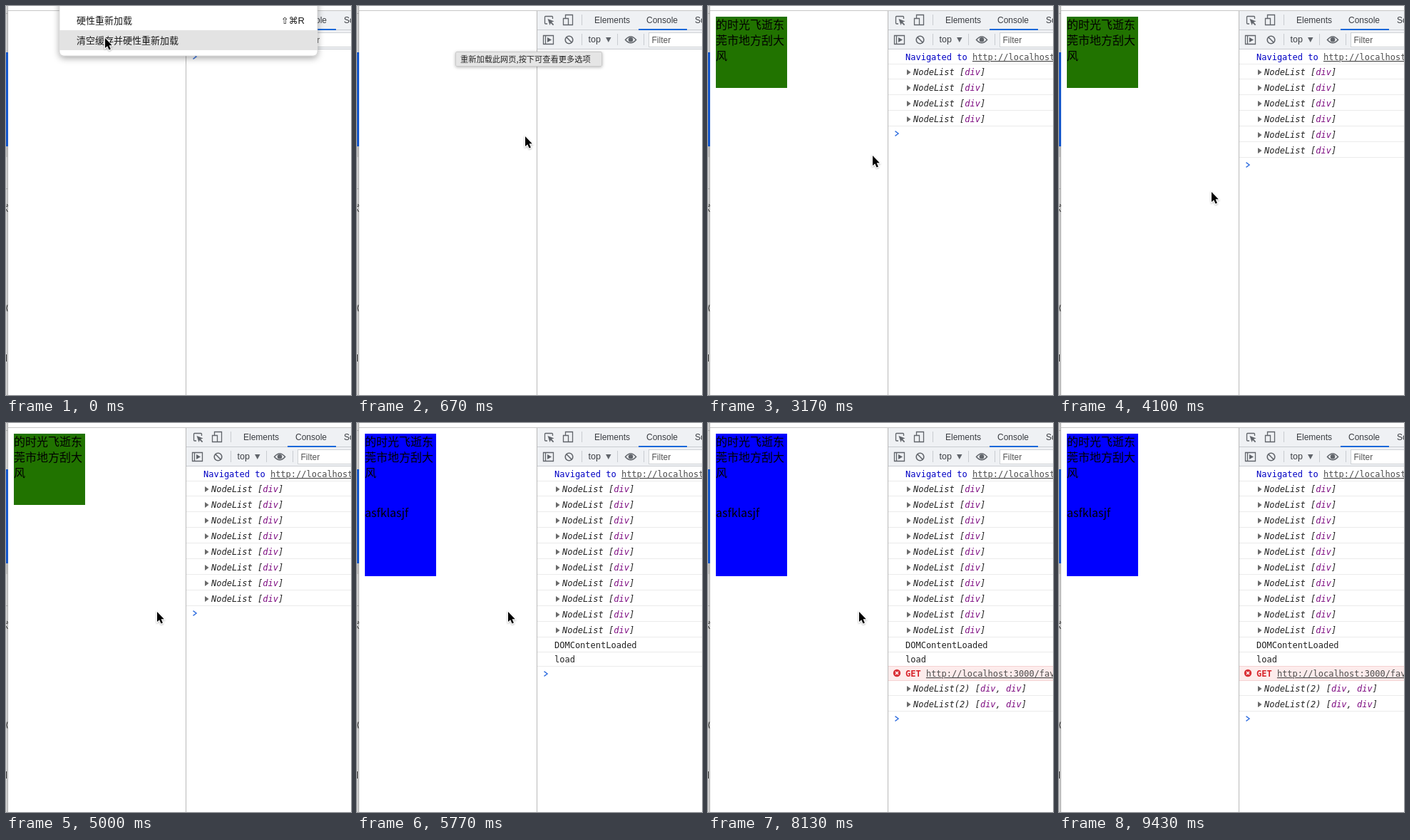
Recreate the animation shown at these times as an HTML page. Size 484 by 546 pixels, loop 9460 ms.

```html
<!DOCTYPE html>
<html lang="zh">
<head>
<meta charset="utf-8">
<style>
  html, body { margin: 0; width: 100%; height: 100%; overflow: hidden; background: #fff; }
  svg { display: block; width: 484px; height: 546px; }
  text { white-space: pre; }
  .ui { font: 12px "Liberation Sans", Arial, sans-serif; fill: #3a3d42; }
  .cjk { font-family: "Noto Sans CJK SC", "Noto Sans CJK", "Noto Sans CJK JP", sans-serif; }
  .mono { font: 12px "DejaVu Sans Mono", monospace; fill: #222; }
  .node { font-style: italic; }
  .tag { fill: #7d0a80; }
  .nav { fill: #0000c4; }
  .link { fill: #4d4d4d; text-decoration: underline; }
  .icon { fill: none; stroke: #61656b; stroke-width: 1.3; }
  .solid { fill: #61656b; }
  .rule { fill: #c9ccd1; }
  .hide { visibility: hidden; }
</style>
</head>
<body>
<svg viewBox="0 0 484 546">
  <defs>
    <filter id="soft" x="-20%" y="-40%" width="140%" height="200%">
      <feDropShadow dx="0" dy="3" stdDeviation="5" flood-opacity=".35"/>
    </filter>
    <filter id="faint" x="-10%" y="-40%" width="120%" height="200%">
      <feDropShadow dx="0" dy="1" stdDeviation="2" flood-opacity=".3"/>
    </filter>
    <filter id="drop" x="-50%" y="-50%" width="200%" height="200%">
      <feDropShadow dx="0" dy="1" stdDeviation=".8" flood-opacity=".35"/>
    </filter>
  </defs>
  <rect width="484" height="546" fill="#fff"/>

  <!-- window behind, at the left edge -->
  <rect width="3" height="546" fill="#d0d0d0"/>
  <rect y="197" width="3" height="15" fill="#bdbdbd"/>
  <rect x="2" width="1" height="546" fill="#adadad"/>
  <rect y="65" width="3" height="132" fill="#1759cc"/>
  <path d="M0 10.5H3M0 256.5H3" stroke="#a8a8a8"/>
  <path d="M0 281H3M0 285L2.5 289M1 278L3 280M2 419.5Q-.5 424 2 428.5M.5 489V499" fill="none" stroke="#222"/>
  <rect x="3" y="6" width="481" height="1" fill="#c6c6c6"/>

  <!-- page content -->
  <g id="page" class="cjk" font-size="16">
    <rect id="box" x="11" y="15" width="100" height="100"/>
    <text x="11" y="32">的时光飞逝东</text>
    <text x="11" y="54">莞市地方刮大</text>
    <text x="11" y="76">风</text>
    <text id="second" x="11" y="132">asfklasjf</text>
  </g>

  <!-- developer tools -->
  <rect x="252" y="7" width="1" height="539" fill="#b9b9b9"/>
  <rect x="253" y="7" width="231" height="54" fill="#eff1f4"/>
  <rect class="rule" x="253" y="33" width="231" height="1"/>
  <rect class="rule" x="253" y="60" width="231" height="1"/>
  <rect x="395" y="32" width="68" height="2" fill="#1a68d9"/>
  <path class="rule" d="M315 12h1v15h-1zM315 39h1v16h-1zM365 39h1v16h-1zM402 39h1v16h-1z"/>
  <g class="icon">
    <path d="M267 25H264.5Q263.5 25 263.5 24V15.500Q263.500 14.500 264.500 14.500H273.500Q274.500 14.500 274.500 15.500V18"/>
    <path d="M292.500 17V12.500H302.500V26.500H297M289.500 17.500H296.500V26.500H289.500Z"/>
    <path d="M261.500 41.500H275.500V53.500H261.500ZM264.500 41.500V53.500"/>
    <circle cx="297.500" cy="47.500" r="5.300" stroke-width="1.600"/>
    <path d="M293.800 43.800L301.200 51.200" stroke-width="1.600"/>
    <path d="M376.500 47.500Q384 38.500 391.500 47.500Q384 56 376.500 47.500Z" stroke-width="1.600"/>
  </g>
  <g class="solid">
    <path d="M267.500 18L276.500 21.500L273 22.800L276.200 26L275 27.200L271.800 24L270.500 27Z"/>
    <path d="M267 44L273 47.500L267 51Z"/>
    <path d="M349 44H356.500L352.750 51Z"/>
    <circle cx="384" cy="47.300" r="3.300"/>
  </g>
  <rect x="409.500" y="37.500" width="80" height="20" fill="#fff" stroke="#cfd2d6"/>
  <g class="ui">
    <text x="333" y="24">Elements</text>
    <text x="406" y="24">Console</text>
    <text x="474" y="24">Sources</text>
    <text x="324.500" y="51" font-size="12.500">top</text>
    <text x="413.500" y="52" fill="#555">Filter</text>
  </g>
  <g id="log"></g>
  <path id="prompt" d="M262.500 -3.300L267 0L262.500 3.300" fill="none" stroke="#3672e0" stroke-width="1.500"/>

  <!-- popups and pointer -->
  <g id="menu">
    <rect x="75" y="-30" width="362" height="100" rx="6" fill="#fff" stroke="#b5b5b5" stroke-width=".5" filter="url(#soft)"/>
    <rect x="75" y="34" width="362" height="28" fill="#e3e3e3"/>
    <g class="cjk" font-size="13" fill="#1c1c1c">
      <text x="99" y="25">硬性重新加载</text>
      <text x="99" y="53">清空缓存并硬性重新加载</text>
      <text x="419" y="25" text-anchor="end" style="font-family:'Liberation Sans','DejaVu Sans',sans-serif">⇧⌘R</text>
    </g>
  </g>
  <g id="tip">
    <rect x="138.500" y="64.500" width="205" height="20" rx="1.500" fill="#e5e5e5" stroke="#cbcbcb" filter="url(#faint)"/>
    <text class="cjk" x="145" y="78.500" font-size="11.230" fill="#262626">重新加载此网页,按下可查看更多选项</text>
  </g>
  <path id="pointer" d="M0 0V14L3.200 11.200L5.600 16.600L7.900 15.600L5.600 10.300H9.800Z" stroke="#fff" paint-order="stroke" stroke-width="1.800" filter="url(#drop)"/>
</svg>
<script>
const LOOP = 9460, COMMIT = 710, TICK = 500, DONE = 5730;
const $ = id => document.getElementById(id);
const show = (el, on) => el.classList.toggle('hide', !on);

const span = (cls, s) => `<tspan class="${cls}">${s}</tspan>`;
const nodeRow = (label, count) =>
  `${label} [${Array(count).fill(span('tag', 'div')).join(', ')}]`;

// Console lines: time of arrival, row height and content.
const rows = [{ at: COMMIT, h: 21, kind: 'nav', html: 'Navigated to ' + span('link', 'http://localhost:3000/') }];
for (let i = 1; i <= 10; i++)
  rows.push({ at: COMMIT + TICK * i, h: i > 1 ? 22 : 21, kind: 'node', html: nodeRow('NodeList', 1) });
rows.push(
  { at: DONE, h: 21, kind: 'plain', html: 'DOMContentLoaded' },
  { at: DONE, h: 20, kind: 'plain', html: 'load' },
  { at: DONE + 50, h: 20, kind: 'error', html: '<tspan fill="#d8252c" font-weight="bold">GET</tspan> ' + span('link', 'http://localhost:3000/favicon.ico') });
for (let i = 11; i <= 12; i++)
  rows.push({ at: COMMIT + TICK * i, h: i > 11 ? 22 : 21, kind: 'node', html: nodeRow('NodeList(2)', 2) });

let bottom = 60;
for (const row of rows) {
  const top = bottom + 1, { kind, html } = row;
  bottom = row.bottom = bottom + row.h;
  const base = bottom - 5, error = kind === 'error', node = kind === 'node';
  let svg = `<rect x="253" y="${bottom}" width="231" height="1" fill="${error ? '#f6d3d3' : '#ebebeb'}"/>`;
  if (error) svg += `<rect x="253" y="${top - 1}" width="231" height="${row.h}" fill="#fdecec"/>
    <rect x="253" y="${top - 1}" width="231" height="1" fill="#f6d3d3"/>
    <circle cx="265" cy="${base - 5}" r="5.2" fill="#d93036"/>
    <path d="M263 ${base - 7}l4 4m0-4l-4 4" stroke="#fff" stroke-width="1.4"/>`;
  if (node) svg += `<path d="M279 ${base - 8}v8l5.500-4z" fill="#6a6a6a"/>`;
  svg += `<text class="mono ${kind}" x="${node ? 288 : 277}" y="${base}">${html}</text>`;
  row.el = document.createElementNS('http://www.w3.org/2000/svg', 'g');
  row.el.innerHTML = svg;
  $('log').append(row.el);
}

// Pointer path: time, x, y.
const path = [
  [0, 139, 45], [200, 139, 45], [600, 236, 183], [2600, 236, 183], [2900, 234, 201],
  [3170, 231, 210], [3870, 217, 251], [4200, 212, 265], [8250, 212, 265], [8715, 190, 505]
];
function pointerAt(t) {
  const i = path.findIndex(p => p[0] > t);
  const [t0, x0, y0] = path[i - 1], [t1, x1, y1] = path[i];
  const k = (t - t0) / (t1 - t0);
  return [x0 + (x1 - x0) * k, y0 + (y1 - y0) * k].map(Math.round);
}

function render(t) {
  show($('menu'), t < 170);
  show($('tip'), t >= 230 && t < 1000);

  const loaded = t >= DONE;
  show($('page'), t >= COMMIT);
  $('box').setAttribute('height', loaded ? 200 : 100);
  $('box').setAttribute('fill', loaded ? '#0000ff' : '#217300');
  $('second').setAttribute('display', loaded ? 'inline' : 'none');

  let end = 60;
  for (const row of rows) {
    const on = t >= row.at;
    show(row.el, on);
    if (on) end = row.bottom;
  }
  show($('prompt'), t < 170 || t >= COMMIT);
  $('prompt').setAttribute('transform', `translate(0 ${end + 11})`);

  const visible = t < 8715;
  show($('pointer'), visible);
  if (visible) $('pointer').setAttribute('transform', `translate(${pointerAt(t)})`);
}

const start = performance.now();
function frame() {
  render((performance.now() - start) % LOOP);
  requestAnimationFrame(frame);
}
frame();
</script>
</body>
</html>
```
